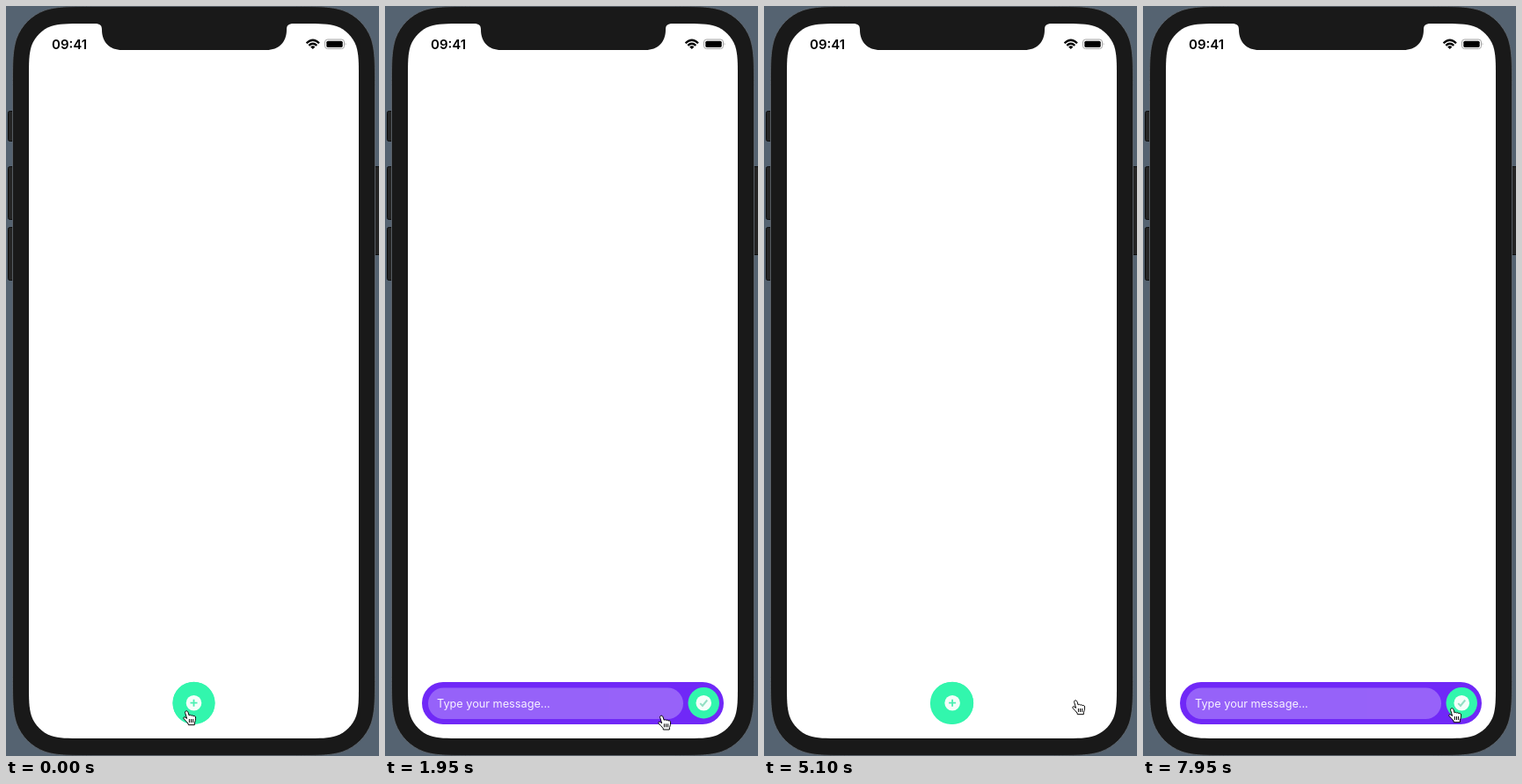
These frames come from a looping animation (424x852 px, 8000 ms). An HTML page:

```html
<!DOCTYPE html>
<html lang="en">
<head>
<meta charset="utf-8">
<title>Expanding message bar</title>
<style>
  html, body { margin: 0; width: 100%; height: 100%; overflow: hidden; background: #556371; }
  svg { display: block; width: 424px; height: 852px; }
  text { font-family: Inter, Roboto, sans-serif; }
</style>
</head>
<body>
<svg viewBox="0 0 424 852">
  <rect width="424" height="852" fill="#556371"/>

  <!-- Phone body and side buttons -->
  <g fill="#252525" stroke="#0d0d0d">
    <rect x="2.5" y="119.5" width="9" height="34" rx="2"/>
    <rect x="2.5" y="182.5" width="9" height="60" rx="2"/>
    <rect x="2.5" y="251.5" width="9" height="60" rx="2"/>
    <rect x="415" y="182.5" width="11" height="100" rx="2"/>
  </g>
  <path id="body" fill="#191919" stroke="#656d74" stroke-width=".8"/>
  <path id="screen" fill="#fff"/>
  <path d="M101 19V20C107 20 109 22 109 27C109 41 118 50 132 50H296C310 50 319 41 319 27C319 22 321 20 327 20V19Z" fill="#191919"/>

  <!-- Status bar -->
  <text x="52" y="48.5" font-size="15" font-weight="600">09:41</text>
  <g fill="none" stroke="#000" stroke-width="2.3">
    <path d="M341.6 42.2Q348.8 35.2 356 42.2"/>
    <path d="M344.3 44.8Q348.8 40.6 353.3 44.8"/>
  </g>
  <path d="M346.2 46.4Q348.8 44.3 351.4 46.4L348.8 49Z"/>
  <rect x="362.5" y="38" width="22" height="10.5" rx="3" fill="none" stroke="#a5a5a5"/>
  <rect x="364.3" y="39.7" width="18.4" height="7.2" rx="1.6"/>
  <path d="M385.7 41.4Q387.4 43.2 385.7 45.1Z" fill="#a5a5a5"/>

  <!-- Message bar -->
  <rect id="bar" y="768" height="48" rx="24"/>
  <g id="input">
    <rect id="field" y="774.5" width="290" height="35.5" rx="17.75" fill="#fff" fill-opacity=".27"/>
    <rect id="caret" y="781" width="2.2" height="21.5" rx="1" fill="#4453dc"/>
    <text id="hint" y="796.5" font-size="12.7" fill="#fff" fill-opacity=".92">Type your message...</text>
  </g>
  <g id="button">
    <circle id="disc" fill="#32f6ad"/>
    <circle r="8.8" fill="#f4fffa"/>
    <path id="plus" d="M-4 0H4M0-4V4" fill="none" stroke="#4cf0b3" stroke-width="1.8"/>
    <path id="check" d="M-4 .4L-1.3 3.2L4-3.2" fill="none" stroke="#93dfc4" stroke-width="2"/>
  </g>

  <!-- Pointing hand -->
  <path id="hand" fill="#fff" stroke="#000" stroke-linejoin="round" d="M3.2 1.2C4.6.2 5.6 1.2 6 2.4L7.2 6C8 5 9.3 5.2 9.6 6.2C10.3 5.4 11.6 5.7 11.9 6.8C12.8 6 14.4 6.6 14.5 8C14.7 10.4 14.2 12.4 13.4 14.2L13.3 16.7H6.3L6 15C4.5 13.5 2.5 11 1 9.6C.2 8.6 1.3 7.4 2.6 8L4.6 9.4L2.7 3.2C2.3 2.2 2.5 1.5 3.2 1.2ZM7.4 10V14M9.5 10V14M11.6 10V14"/>
</svg>

<script>
const LOOP = 8000, OPEN_1 = 45, CLOSE = 4260, OPEN_2 = 6506, FOCUS = 2550;
const GREEN = [50, 246, 173], PURPLE = [112, 40, 247];

// Pointer stops: time, x, y
const STOPS = [
  [0, 201, 800], [250, 202, 801], [800, 315, 809], [1750, 315, 809],
  [2350, 296, 795], [2700, 296, 795], [3200, 387, 795], [3550, 405, 798],
  [3800, 404, 798], [4200, 356, 795], [4400, 356, 795], [4800, 350, 788],
  [5200, 350, 788], [5600, 200, 813], [5950, 69, 802], [6200, 214, 802],
  [6400, 200, 800], [7250, 200, 800], [7600, 300, 813], [7850, 347, 797], [8000, 347, 797]
];

const el = id => document.getElementById(id);
const [body, screen, bar, input, field, caret, hint, button, disc, plus, check, hand] =
  ['body', 'screen', 'bar', 'input', 'field', 'caret', 'hint', 'button', 'disc', 'plus', 'check', 'hand'].map(el);
const set = (node, attrs) => {
  for (const name in attrs) node.setAttribute(name, attrs[name]);
};
const mix = (a, b, p) => a + (b - a) * p;
const clamp = v => Math.max(0, Math.min(1, v));
const smooth = p => p * p * (3 - 2 * p);

// Rectangle whose corners ease smoothly from the sides into the arc
function squircle(x, y, width, height, r) {
  const corner = [[0, 1.529], [0, 1.088], [0, .868], [.075, .631], [.169, .373],
    [.373, .169], [.631, .075], [.868, 0], [1.088, 0], [1.529, 0]];
  const place = (flipX, flipY) => {
    const points = corner.map(([u, v]) =>
      [flipX ? x + width - u * r : x + u * r, flipY ? y + height - v * r : y + v * r]);
    const [start, ...curve] = flipX === flipY ? points : points.reverse();
    return `${start}C${curve.join(' ')}`;
  };
  return `M${place(false, false)}L${place(true, false)}L${place(true, true)}L${place(false, true)}Z`;
}

// Critically damped spring from 0 to 1
function spring(ms) {
  const x = Math.max(0, ms) * 0.0091;
  return 1 - (1 + x) * Math.exp(-x);
}

function pointerAt(t) {
  const i = STOPS.findIndex(stop => stop[0] > t);
  const [t0, x0, y0] = STOPS[i - 1], [t1, x1, y1] = STOPS[i];
  const p = smooth((t - t0) / (t1 - t0));
  return [mix(x0, x1, p), mix(y0, y1, p)];
}

function draw(t) {
  const closing = t >= CLOSE && t < OPEN_2;
  const open = closing ? 1 - spring(t - CLOSE) : spring(t - (t < CLOSE ? OPEN_1 : OPEN_2));
  const width = mix(48, 343, open), left = 213.5 - width / 2;
  const tint = open ** 1.5;
  const rgb = GREEN.map((c, i) => Math.round(mix(c, PURPLE[i], tint)));
  set(bar, { x: left, width, fill: `rgb(${rgb})` });

  // The field appears at its final place, but leaves along with the bar.
  const inputLeft = closing ? left : 42;
  set(input, { opacity: open < 0.01 ? 0 : open });
  set(field, { x: inputLeft + 7 });
  set(hint, { x: inputLeft + 17 });
  const blink = clamp(0.5 + 1.5 * Math.cos((t - FOCUS) / 1000 * 2 * Math.PI));
  const focused = t >= FOCUS && t < OPEN_2;
  set(caret, { x: inputLeft + 16.5, opacity: focused ? (closing ? 1 : blink) : 0 });

  const radius = mix(24, 17.75, open);
  const centre = left + width - mix(0, 5, open) - radius;
  set(button, {
    transform: `translate(${centre} 791.7)`,
    opacity: 1 - 0.5 * open * (1 - open)
  });
  set(disc, { r: radius });
  const showCheck = !closing && t >= OPEN_1;
  set(plus, { opacity: showCheck ? 0 : 1 });
  set(check, { opacity: showCheck ? 1 : 0 });

  set(hand, { transform: `translate(${pointerAt(t)})` });
}

function frame() {
  draw(performance.now() % LOOP);
  requestAnimationFrame(frame);
}

set(body, { d: squircle(7.5, 0.5, 412, 851, 58) });
set(screen, { d: squircle(26, 20, 375, 812, 40) });
frame();
</script>
</body>
</html>
```
